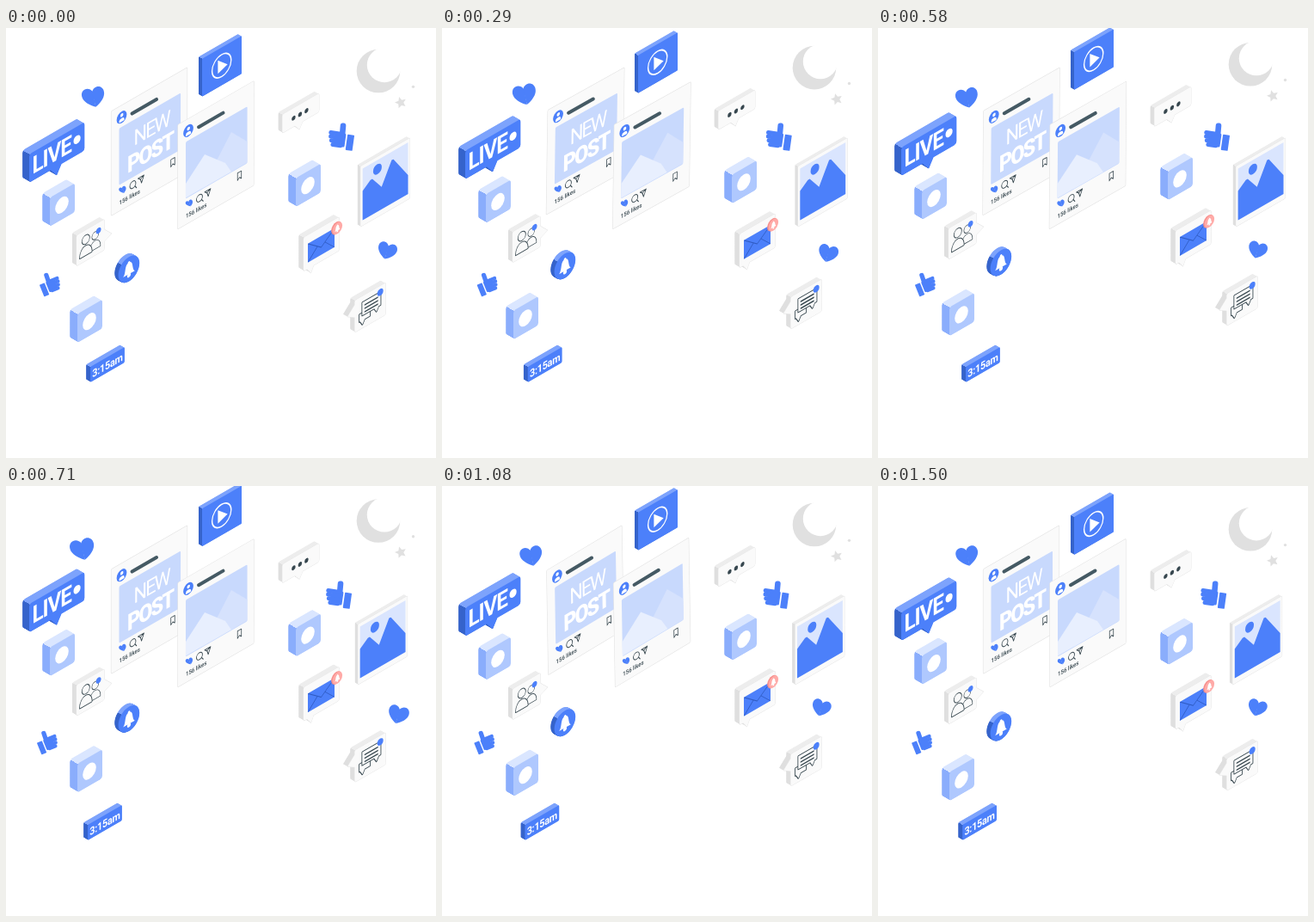
Animation, 500 px wide and 500 px high, one loop 1540 ms. Source, as an HTML page with a canvas:

```html
<!DOCTYPE html>
<html lang="en">
<head>
<meta charset="utf-8">
<title>Floating posts</title>
<style>
html, body { margin: 0; width: 100%; height: 100%; overflow: hidden; background: #fff; }
canvas { display: block; width: 500px; height: 500px; }
</style>
</head>
<body>
<canvas id="stage" width="500" height="500"></canvas>
<script>
const ctx = document.getElementById('stage').getContext('2d');
const LOOP = 1540;
const ISO = 0.866;
const INK = '#37474f';
const BLUE = '#4c80fa';
const PAPER = '#fafafa';
// front, left side, top
const blue = [BLUE, '#3563cb', '#7da3fc'];
const pale = ['#afc8fe', '#8aadfc', '#dae6ff'];
const grey = [PAPER, '#dfdfdf', '#ededed'];

function at(x, y, draw, angle = 0, sx = 1, sy = sx) {
  ctx.save();
  ctx.translate(x, y);
  ctx.rotate(angle);
  ctx.scale(sx, sy);
  draw();
  ctx.restore();
}

// Draws on the tilted plane that all signs share
function iso(x, y, draw) {
  ctx.save();
  ctx.transform(ISO, -0.5, 0, 1, x, y);
  draw();
  ctx.restore();
}

function paint(fill, stroke, width = 1) {
  if (stroke) {
    ctx.strokeStyle = stroke;
    ctx.lineWidth = width;
    ctx.stroke();
  }
  if (fill) {
    ctx.fillStyle = fill;
    ctx.fill();
  }
}

function path(points, closed = false) {
  ctx.beginPath();
  for (let i = 0; i < points.length; i += 2) ctx.lineTo(points[i], points[i + 1]);
  if (closed) ctx.closePath();
}

function line(color, width, ...points) {
  path(points);
  paint(null, color, width);
}

function poly(color, ...points) {
  path(points, true);
  paint(color);
}

function box(color, x, y, w, h, r = 0) {
  ctx.beginPath();
  ctx.roundRect(x, y, w, h, r);
  paint(color);
}

function dot(color, x, y, r) {
  ctx.beginPath();
  ctx.arc(x, y, r, 0, Math.PI * 2);
  paint(color);
}

function ring(color, width, x, y, r, fill) {
  ctx.beginPath();
  ctx.arc(x, y, r, 0, Math.PI * 2);
  paint(fill, color, width);
}

const isoDot = (color, x, y, r) => iso(x, y, () => dot(color, 0, 0, r));

function label(text, x, y, font, color, spacing = 0) {
  iso(x, y, () => {
    ctx.font = font + ' Roboto, Arial, sans-serif';
    ctx.letterSpacing = spacing + 'px';
    ctx.fillStyle = color;
    ctx.fillText(text, 0, 0);
  });
}

// Extruded sign; x, y is the upper left corner of its front, tail a triangle
function slab([front, side, top], x, y, width, h, depth, r, tail) {
  const shape = new Path2D();
  shape.roundRect(0, 0, width / ISO, h, r);
  if (tail) shape.addPath(new Path2D('M' + tail + 'Z'));
  iso(x, y, () => {
    const shade = ctx.createLinearGradient(-1, 1, 1, -1);
    shade.addColorStop(0.5, side);
    shade.addColorStop(0.5, top);
    ctx.fillStyle = shade;
    for (let d = depth; d > 0; d -= 0.4) {
      ctx.save();
      ctx.translate(-d, -d);
      ctx.fill(shape);
      ctx.restore();
    }
    if (front === PAPER) {
      ctx.strokeStyle = '#e6e6e6';
      ctx.stroke(shape);
    }
    ctx.fillStyle = front;
    ctx.fill(shape);
  });
}

// Triangle under a sign's lower edge
const tailBelow = (x, h, half, length) => [x + half, h - 1, x + 1, h + length, x - half, h - 1];

function heart(x, y, size, angle) {
  at(x, y, () => {
    for (const side of [-1, 1]) {
      ctx.beginPath();
      ctx.moveTo(0, 0.44);
      ctx.bezierCurveTo(side * 0.24, 0.32, side * 0.5, 0.1, side * 0.5, -0.14);
      ctx.bezierCurveTo(side * 0.5, -0.46, side * 0.12, -0.53, -side * 0.02, -0.23);
      paint(BLUE);
    }
  }, angle, size);
}

function thumb(x, y, angle, sx, sy) {
  at(x, y, () => {
    box(BLUE, -15, -3, 8, 19, 0.8);
    box(BLUE, -5.3, -3.5, 13, 16.5, 1.5);
    at(-3.6, -16, () => box(BLUE, 0, 0, 6.6, 17, 3), 0.05);
    for (let i = 0; i < 4; i++) box(BLUE, -3, -5 + i * 4.7, 18 - i * i * 0.45, 5.2, 2.4);
  }, angle, sx, sy);
}

function bell(x, y, size) {
  iso(x, y, () => {
    ctx.scale(size, size);
    ctx.beginPath();
    ctx.moveTo(-7, 5);
    ctx.bezierCurveTo(-3, 2, -6, -7, 0, -7);
    ctx.bezierCurveTo(6, -7, 3, 2, 7, 5);
    paint('#fff');
    dot('#fff', 0, -7, 1.4);
    dot('#fff', 0, 6.3, 2.2);
  });
}

function moon() {
  const color = '#e0e0e0';
  dot(color, 433, 50.3, 25.3);
  dot('#fff', 440, 43.2, 20.2);
  const star = [];
  for (let i = 0; i < 10; i++) {
    const angle = i * Math.PI / 5 - 1.85;
    const r = i % 2 ? 3.3 : 7;
    star.push(459 + r * Math.cos(angle), 87 + r * Math.sin(angle));
  }
  poly(color, ...star);
  dot(color, 473.5, 68.6, 1.7);
}

function post(x, y, drawImage) {
  iso(x, y, () => {
    ctx.beginPath();
    ctx.roundRect(0, 0, 101.6, 121, 1);
    paint(PAPER, '#e4e4e4', 1.4);
    box('#c8d9fd', 10.4, 25, 82.6, 66, 1.5);
  });
  drawImage();

  isoDot(BLUE, x + 12, y + 6.8, 6.8);
  isoDot('#fff', x + 12.2, y + 4.4, 2);
  iso(x + 12, y + 10.3, () => box('#fff', -3.6, -2.4, 7.2, 4, [3, 3, 1, 1]));
  line('#455a64', 4, x + 24, y + 2.6, x + 52.5, y - 14);

  heart(x + 13.4, y + 91.2, 8.6, -0.4);
  iso(x + 25, y + 85.2, () => {
    ring(INK, 1, 0, 0, 4);
    line(INK, 1, 2.8, 3, 5, 6);
  });
  iso(x + 34.5, y + 78.5, () => line(INK, 1, -0.8, 0.1, -4, -2.4, 4, -2.4, 0.8, 5, -0.8, 0.1, 4, -2.4));
  iso(x + 71.5, y + 59, () => {
    path([-2.6, -4.2, 2.6, -4.2, 2.6, 4.4, 0, 2, -2.6, 4.4], true);
    paint(null, INK, 0.9);
  });
  label('156 likes', x + 9, y + 109, '500 7px', INK);
}

function headline() {
  label('NEW', 148.6, 137.2, '400 25px', '#fff', -2.2);
  label('POST', 141, 169.2, '800 27px', '#fff', -2.2);
}

function hills() {
  poly('#d6e2fd', 228, 187, 262, 121, 280.4, 132, 280.4, 156.5);
  poly('#e8effe', 209, 181, 231, 147, 255, 157, 262, 167, 209, 197.6);
}

function posts() {
  post(122.5, 97, headline);
  post(200, 112.6, hills);
}

function tile(x, y) {
  slab(pale, x, y, 29, 33.5, 10, 3);
  isoDot('#fff', x + 14, y + 8.6, 9);
}

function liveSign() {
  slab(blue, 27, 147, 64.3, 33, 9, 3, tailBelow(36, 33, 8, 10));
  label('LIVE', 30.6, 170.4, '700 28px', '#fff', -1.3);
  isoDot('#fff', 82.6, 130, 4.7);
}

function playSign() {
  slab(blue, 228, 36, 46, 44, 4.6, 1);
  iso(250.7, 44, () => {
    ring('#fff', 1.6, 0, 0, 12.8);
    poly('#fff', -5, -8.5, -5, 7, 8, 2.4);
  });
}

function dotsSign() {
  slab(grey, 321.3, 101, 42.7, 21.5, 5.4, 2, tailBelow(22, 21.5, 6, 7));
  for (let i = 0; i < 3; i++) isoDot(INK, 334.4 + i * 7.5, 105 - i * 4.3, 2.6);
}

function mailSign() {
  slab(grey, 346, 244, 41.4, 39, 6.5, 2, tailBelow(9, 39, 5, 7));
  iso(351, 251, () => {
    const [w, h] = [35.8, 22];
    box(BLUE, 0, 0, w, h, 1);
    line('#2f5bc2', 0.9, 0.5, 0.5, w / 2, h * 0.6, w - 0.5, 0.5);
    line('#2f5bc2', 0.8, 0.5, h - 0.5, w * 0.35, h * 0.45);
    line('#2f5bc2', 0.8, w * 0.65, h * 0.45, w - 0.5, h - 0.5);
  });
  isoDot('#f78f8c', 384.2, 232.8, 7);
  isoDot('#ffaaa7', 385.4, 233, 6.6);
  bell(385.4, 233.2, 0.52);
}

function person(x, y, size) {
  iso(x, y, () => {
    ctx.scale(size, size);
    ctx.beginPath();
    ctx.moveTo(-8.4, 19);
    ctx.bezierCurveTo(-8.4, 4, 8.4, 4, 8.4, 19);
    ctx.closePath();
    paint(PAPER, INK, 2);
    ring(INK, 2, 0, 0, 5, PAPER);
  });
}

function peopleSign() {
  slab(grey, 82, 241.4, 32.4, 35.6, 5.8, 2, [36.4, 11, 46.9, 21.4, 36.4, 26]);
  person(103.7, 241.6, 0.8);
  person(92.8, 246.2, 0.95);
  isoDot(BLUE, 107.6, 235.8, 3.4);
}

function bellSign() {
  slab(blue, 130.6, 273.6, 24.6, 28.4, 5, 14.2);
  bell(143, 280.8, 1.12);
}

function speech(x, y, w, h, tailX) {
  iso(x, y, () => {
    path([0, 0, w, 0, w, h, tailX + 3, h, tailX, h + 5, tailX - 3, h, 0, h], true);
    paint(PAPER, INK, 2);
  });
}

function chatSign() {
  slab(grey, 405.5, 317.2, 36, 37, 6, 2, [1, 20, -9.6, 14, 1, 4]);
  speech(411, 333.5, 14, 8.5, 4);
  speech(414.3, 319.4, 24.5, 15, 19);
  iso(417.4, 322, () => {
    for (let i = 0; i < 3; i++) line(INK, 1.6, 0, i * 4, 17, i * 4);
  });
  isoDot(BLUE, 435.2, 307.4, 4);
}

function picture() {
  slab(grey, 412.4, 161, 57.3, 70, 4, 1);
  iso(414.8, 163.5, () => {
    const [w, h] = [61, 60];
    box('#dae5fe', 0, 0, w, h);
    poly(BLUE, 0, 26, 10.5, 18.5, 13, 18.5, 25.5, 34, 39, 9.5, 41.5, 10, w, 38, w, h, 0, h);
    dot(BLUE, 19.9, 10.6, 5.8);
  });
}

function clock() {
  slab(blue, 98.2, 394, 39.8, 18, 5.6, 1.5);
  label('3:15am', 100.4, 406.8, '700 12.5px', '#fff', -0.3);
}

function floating() {
  moon();
  playSign();
  liveSign();
  tile(51, 197.5);
  tile(83, 332.8);
  tile(337, 174.8);
  dotsSign();
  mailSign();
  peopleSign();
  bellSign();
  chatSign();
}

function shaking() {
  picture();
  clock();
  thumb(390, 125.6, 0.14, -1, 0.96);
  thumb(51, 296.4, -0.38, 0.8, 0.78);
}

function hearts() {
  heart(104 - 272, 81.5 - 170, 26, -0.22);
  heart(441 - 272, 258 - 170, 22, 0.28);
}

// Each swing grows to a limit, then dies down the same way
function swing(step) {
  const n = Math.min(step, 10 - step);
  return n > 0 ? (-1) ** n * Math.min(4, 2 ** (n - 1)) : 0;
}

function shake(p) {
  const step = Math.floor(p * 10);
  return swing(step) + (swing(step + 1) - swing(step)) * (p * 10 - step);
}

const pulse = (p, peak, rise, fall) =>
  Math.max(0, 1 - Math.abs(p - peak) / (p < peak ? rise : fall));

function render(time) {
  const p = Math.min(1, 0.012 + (time % LOOP) / 1490);
  const rise = 10 * pulse(p, 0.5, 0.5, 0.5);
  const beat = 1 + 0.1 * (pulse(p, 0.1, 0.1, 0.2) + pulse(p, 0.5, 0.1, 0.1));
  const tilt = Math.asin(Math.sin(p * Math.PI * 2)) * 2 / Math.PI;

  ctx.clearRect(0, 0, 500, 500);
  ctx.lineCap = ctx.lineJoin = 'round';
  at(205, 140, () => {
    ctx.translate(-205, -140);
    posts();
  }, tilt * Math.PI / 180);
  at(0, -rise, floating);
  at(shake(p), 0, shaking);
  at(272, 170, hearts, 0, beat);
}

const start = performance.now();
function tick() {
  render(performance.now() - start);
  requestAnimationFrame(tick);
}
tick();
</script>
</body>
</html>
```
